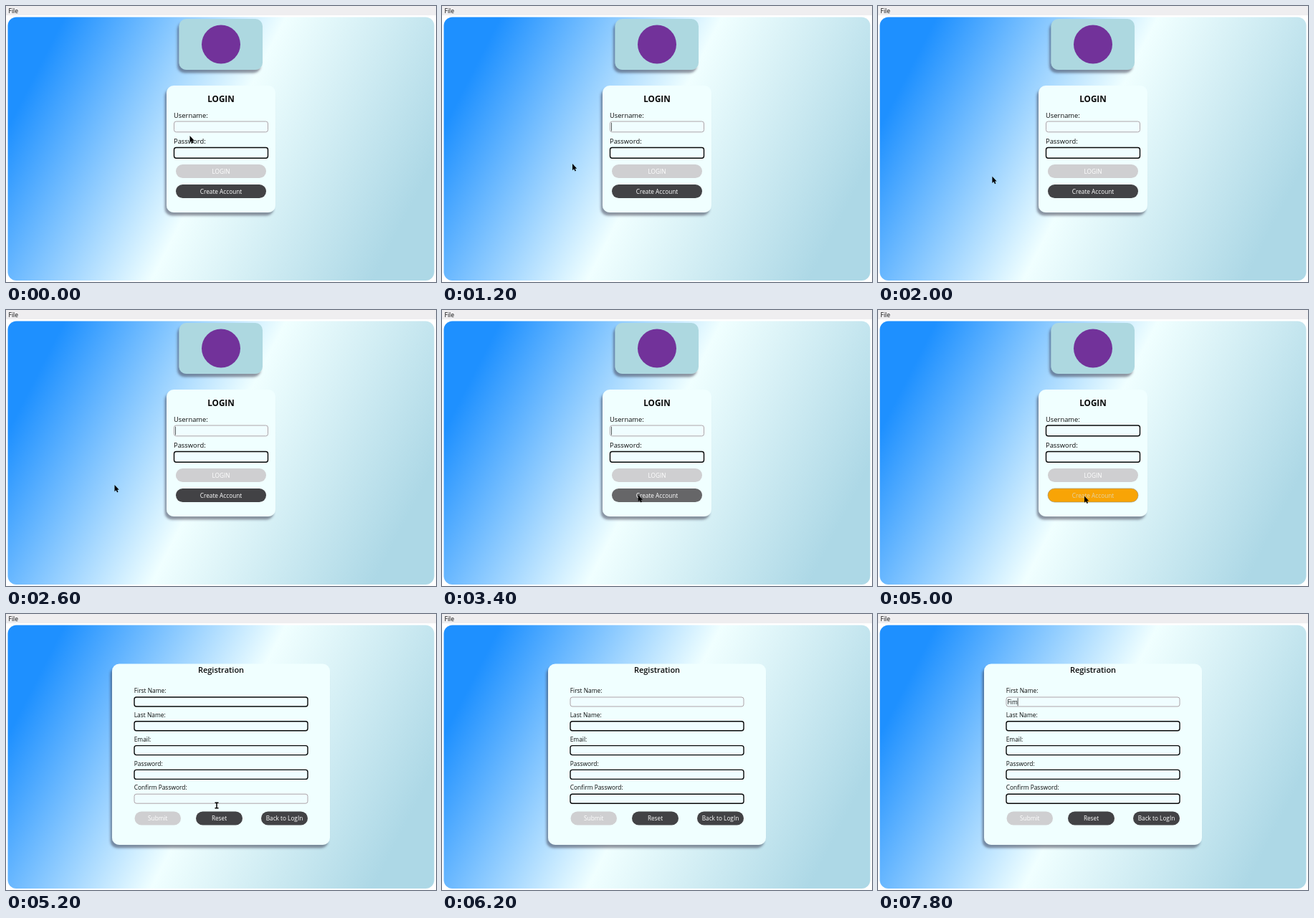
Recreate the animation shown at these times as an HTML page. Size 600 px wide and 385 px high, loop 8000 ms.

```html
<!DOCTYPE html>
<html lang="en">
<head>
<meta charset="utf-8">
<title>Login and registration</title>
<style>
  html, body { margin: 0; width: 100%; height: 100%; overflow: hidden; background: #fff; }
  svg { display: block; width: 100%; height: 100%; }
  text { font-family: "Open Sans", "Noto Sans", sans-serif; fill: #0a0a0a; white-space: pre; }
</style>
</head>
<body>
<svg id="stage" viewBox="0 0 600 385">
  <defs>
    <linearGradient id="sky" gradientUnits="userSpaceOnUse" x1="71" y1="36" x2="561" y2="287">
      <stop offset="0" stop-color="#1e90ff"/>
      <stop offset=".5" stop-color="#f0ffff"/>
      <stop offset="1" stop-color="#add8e6"/>
    </linearGradient>
    <filter id="shadow" x="-20%" y="-20%" width="140%" height="140%">
      <feDropShadow dx="-2.5" dy="4.5" stdDeviation="1.6" flood-color="#334" flood-opacity=".5"/>
    </filter>
  </defs>
  <rect width="600" height="385" fill="#fff"/>
  <rect width="600" height="13" fill="#efeef0"/>
  <rect x="2.5" y="15.5" width="595" height="367.5" rx="12" fill="url(#sky)"/>
  <g id="login"></g>
  <g id="register"></g>
  <path id="arrow" d="M0 0V9.2L2.1 7.3L3.6 10.5L5 9.8L3.6 6.8H6.2Z"/>
  <path id="beam" d="M-2.5 -3.7H2.5M-2.5 3.7H2.5M0 -3.7V3.7" fill="none" stroke="#000" stroke-width="1.5"/>
</svg>
<script>
const LOOP = 8000, TICK = 200;
const $ = id => document.getElementById(id);

function add(parent, tag, attrs, text) {
  const el = document.createElementNS("http://www.w3.org/2000/svg", tag);
  set(el, attrs);
  if (text) el.textContent = text;
  parent.appendChild(el);
  return el;
}
function set(el, attrs) {
  for (const key in attrs) el.setAttribute(key, attrs[key]);
}
function show(el, on) {
  el.setAttribute("visibility", on ? "visible" : "hidden");
}
function label(parent, x, y, size, text, extra) {
  return add(parent, "text", { x, y, "font-size": size, ...extra }, text);
}
function panel(parent, x, y, width, height, fill) {
  add(parent, "rect", { x, y, width, height, rx: 10, fill, filter: "url(#shadow)" });
}
function field(parent, x, y, width, height) {
  const box = add(parent, "rect", { x, y, width, height, rx: 3, fill: "#f0fdff" });
  return { box, x, y, width, height };
}
function button(parent, x, y, width, text, fill) {
  const pill = add(parent, "rect", { x, y, width, height: 19, rx: 9.5, fill });
  const caption = label(parent, x + width / 2, y + 12.6, 8.25, text,
    { "text-anchor": "middle", style: "fill:#fff" });
  return { pill, caption };
}
function focus(f, on) {
  set(f.box, { stroke: on ? "#aea4a9" : "#080808", "stroke-width": on ? 1 : 1.4 });
}
function caretIn(parent, y, height) {
  return add(parent, "rect", { y, width: 0.8, height, fill: "#333" });
}

label($("stage"), 3.5, 10.2, 8.5, "File");

// Login screen
const login = $("login"), AZURE = "#f0ffff", DARK = "#424245", DISABLED = "#cfcfd1";
panel(login, 241.5, 18, 116.5, 71, "#add8e0");
add(login, "circle", { cx: 300, cy: 53.5, r: 27, fill: "#72329a" });
panel(login, 224, 111, 152, 177, AZURE);
label(login, 300, 133.8, 11.7, "LOGIN", { "text-anchor": "middle", "font-weight": 700 });
label(login, 234, 155.7, 9.4, "Username:");
label(login, 234, 191.9, 9.4, "Password:");
const user = field(login, 234.5, 161, 131, 14.8);
const pass = field(login, 234.5, 197.5, 131, 14.8);
const userCaret = caretIn(login, 162.8, 11.5);
set(userCaret, { x: 236 });
button(login, 237, 221, 126, "LOGIN", DISABLED);
const create = button(login, 237, 249, 126, "Create Account", DARK);
focus(pass, false);

// Registration screen
const register = $("register");
panel(register, 148, 69.5, 304, 252.5, AZURE);
label(register, 300, 82.3, 11, "Registration", { "text-anchor": "middle", "font-weight": 600 });
const fields = ["First Name:", "Last Name:", "Email:", "Password:", "Confirm Password:"].map((name, i) => {
  const y = i * 33.8;
  label(register, 178.7, 110.2 + y, 8.42, name);
  return field(register, 179, 116 + y, 242, 13);
});
const typed = label(register, 180.5, 126, 8.42, "");
const nameCaret = caretIn(register, 117.2, 11);
button(register, 179.5, 275.5, 64.5, "Submit", DISABLED);
button(register, 265, 275.5, 65, "Reset", DARK);
button(register, 356, 275.5, 65, "Back to LogIn", DARK);

// Pointer stops: time, x, y
const stops = [
  [0, 256.5, 181], [1200, 182, 220], [2400, 151.5, 244], [2600, 151.5, 244],
  [3600, 288, 259.5], [5000, 288, 259.5], [5200, 294, 267], [5800, 222, 122.5], [LOOP, 222, 122.5]
];
function pointer(t) {
  const i = stops.findIndex((s, k) => t < stops[k + 1][0]);
  const [t0, x0, y0] = stops[i], [t1, x1, y1] = stops[i + 1];
  const u = (t - t0) / (t1 - t0), e = u * u * (3 - 2 * u);
  return [x0 + (x1 - x0) * e, y0 + (y1 - y0) * e];
}
function over(f, x, y) {
  return x > f.x && x < f.x + f.width && y > f.y - 1 && y < f.y + f.height + 3;
}

const CLICK = 5000, SWITCH = 5200, PICK = 5800, HIDE = 6000, TYPE = 7200;
const entries = ["F", "Fi", "Fima", "Fim"];

function draw(t) {
  const [x, y] = pointer(t), second = t >= SWITCH, pressed = t >= CLICK;
  login.style.display = second ? "none" : "";
  register.style.display = second ? "" : "none";

  focus(user, !pressed);
  show(userCaret, !second && !pressed && (t + 1050) % 1100 < 550);
  const hover = x > 237 && x < 363 && y > 249 && y < 268;
  set(create.pill, {
    fill: pressed ? "#f8a406" : hover ? "#666668" : DARK,
    stroke: pressed ? "#8f8a78" : "none", "stroke-width": 0.6
  });
  create.caption.style.fill = pressed ? "#e3d3a6" : "#fff";

  fields.forEach((f, i) => focus(f, i === (t < PICK ? 4 : 0)));
  typed.textContent = t < TYPE ? "" : entries[Math.min(3, Math.floor((t - TYPE) / TICK))];
  const end = second && typed.textContent ? typed.getComputedTextLength() : 0;
  set(nameCaret, { x: 180.4 + end });
  show(nameCaret, second && t >= PICK && (t >= TYPE || t < 6200 || t >= 6800));

  const beam = second && fields.some(f => over(f, x, y)), visible = t < HIDE;
  show($("arrow"), visible && !beam);
  show($("beam"), visible && beam);
  for (const id of ["arrow", "beam"]) set($(id), { transform: `translate(${x} ${y})` });
}

const start = performance.now();
function frame() {
  const t = (performance.now() - start) % LOOP;
  draw(Math.floor(t / TICK) * TICK);
  requestAnimationFrame(frame);
}
frame();
</script>
</body>
</html>
```
